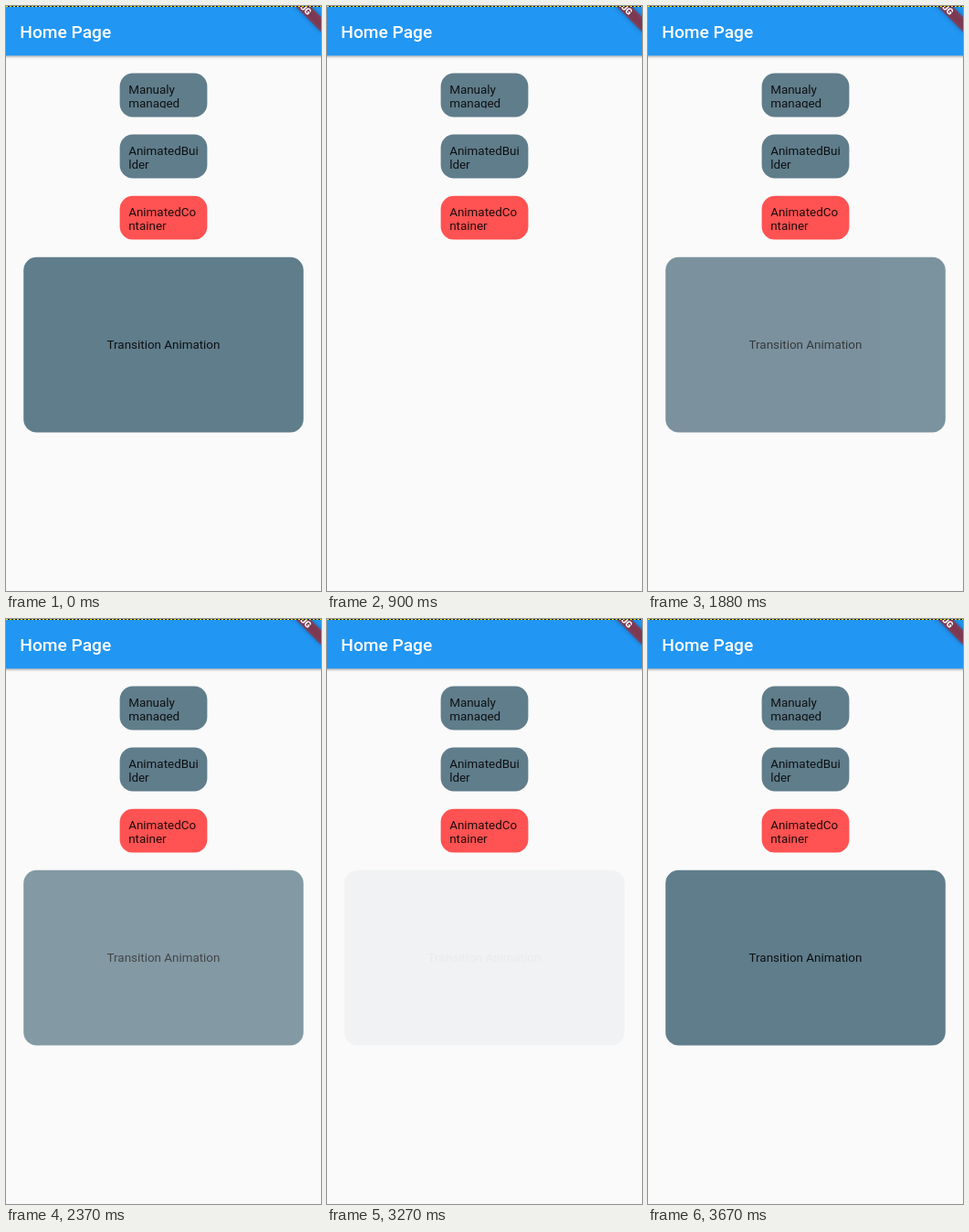
An HTML page for the animation above (4 s loop, 345 by 640 pixels).

```html
<!DOCTYPE html>
<html lang="en">
<head>
<meta charset="utf-8">
<title>Home Page</title>
<style>
  html, body { margin: 0; width: 100%; height: 100%; overflow: hidden; background: #fafafa; }
  svg { display: block; width: 345px; height: 640px; }
  text { font: 13.42px Roboto, sans-serif; fill: rgba(0, 0, 0, .87); }
  .bar { fill: #2196f3; filter: drop-shadow(0 1.5px 1.8px rgba(0, 0, 0, .38)); }
  .title { font-size: 19.17px; font-weight: 500; fill: #fff; }
  .card { fill: #607d8b; }
  .red { fill: #ff5252; }
  .ribbon { fill: #b71c1ca0; filter: drop-shadow(0 0 3px rgba(0, 0, 0, .5)); }
  .debug { font-size: 10.2px; font-weight: 900; fill: #fff; text-anchor: middle; }
</style>
</head>
<body>
<svg viewBox="0 0 345 640">
  <defs>
    <clipPath id="content"><rect x="9.6" y="9.6" width="78" height="28.75"/></clipPath>
  </defs>
  <rect class="bar" x="-10" y="-10" width="365" height="64.2"/>
  <text class="title" x="15.3" y="35">Home Page</text>
  <g id="cards"></g>
  <g id="panel">
    <rect class="card" x="19.2" y="274.8" width="306.6" height="191.6" rx="14.4"/>
    <text x="172.5" y="375.2" text-anchor="middle">Transition Animation</text>
  </g>
  <g transform="translate(345 -26) scale(.9583) rotate(45)">
    <rect class="ribbon" x="-40" y="28" width="80" height="12"/>
    <text class="debug" y="37.6">DEBUG</text>
  </g>
  <path d="M0 .5H345" stroke="#111"/>
  <path d="M0 .5H345" stroke="#ffeb00" stroke-dasharray="2 2"/>
</svg>
<script>
  const LOOP = 4000, STEP = 80, FADE = 300;

  // Each fade starts at a given opacity and advances once per step.
  const fades = [
    { start: 660, end: 900, from: 0.825, dir: -1 },
    { start: 1640, end: 1960, from: 0.025, dir: 1 },
    { start: 2370, end: 2610, from: 0.77, dir: -1 },
    { start: 3270, end: 3670, from: 0.06, dir: 1 }
  ];

  const cards = [
    ["Manualy", "managed", ""],
    ["AnimatedBui", "lder", ""],
    ["AnimatedCo", "ntainer", "red"]
  ];
  document.getElementById("cards").innerHTML = cards.map(([first, second, tone], i) => `
    <g transform="translate(124.6 ${73.5 + i * 67.1})">
      <rect class="card ${tone}" width="95.8" height="47.9" rx="14.4"/>
      <g clip-path="url(#content)">
        <text x="9.6" y="22">${first}</text>
        <text x="9.6" y="37.5">${second}</text>
      </g>
    </g>`).join("");

  function opacityAt(time) {
    const fade = fades.filter(f => time >= f.start).pop();
    if (!fade) return 1;
    if (time >= fade.end) return fade.dir > 0 ? 1 : 0;
    const steps = Math.floor((time - fade.start) / STEP);
    return Math.min(1, Math.max(0, fade.from + fade.dir * steps * STEP / FADE));
  }

  const panel = document.getElementById("panel");
  const origin = performance.now();
  function draw() {
    panel.style.opacity = opacityAt((performance.now() - origin) % LOOP);
    requestAnimationFrame(draw);
  }
  draw();
</script>
</body>
</html>
```
